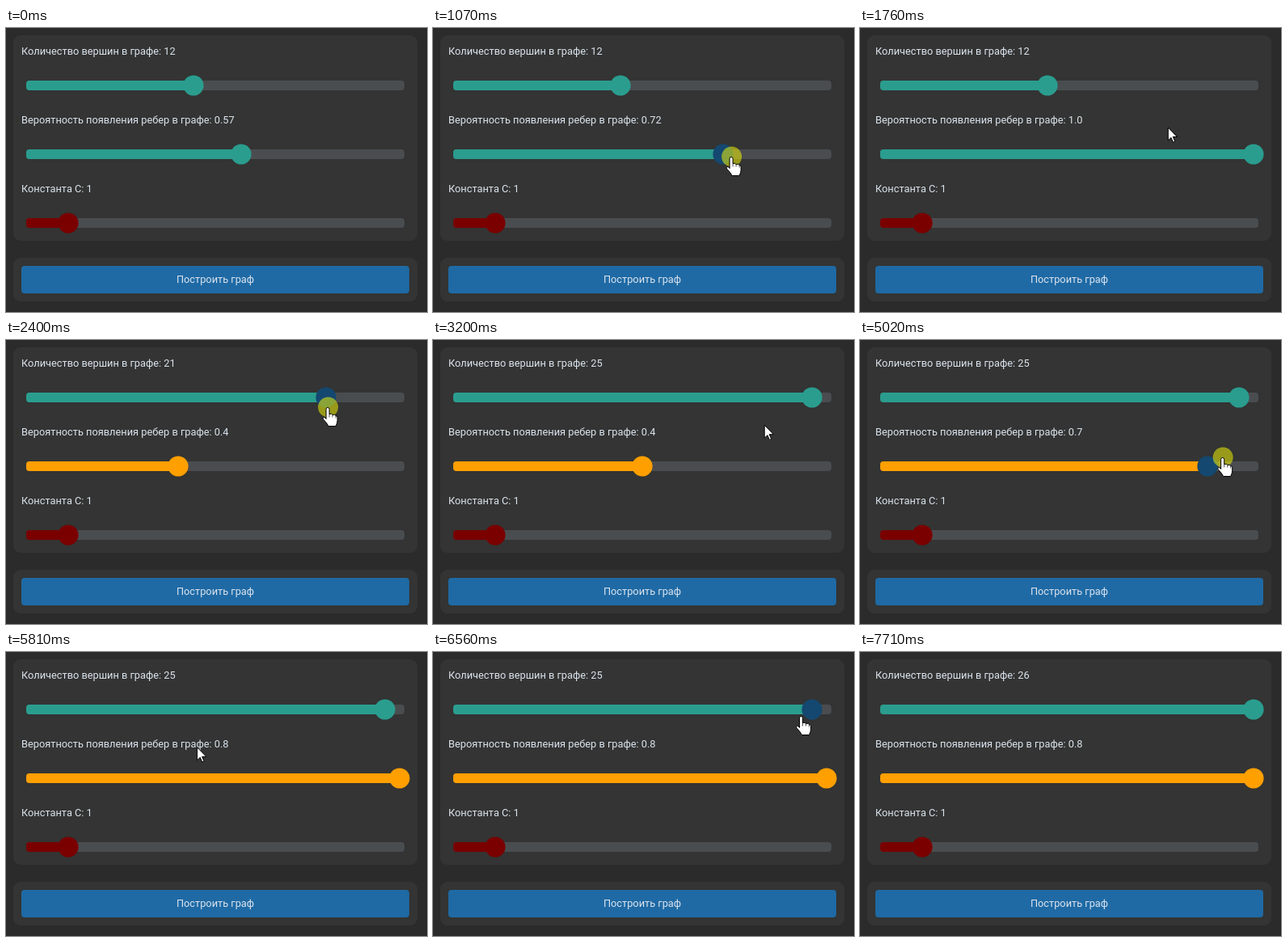
An HTML page that plays this animation: 521 px wide and 351 px high, repeating every 8000 ms.

```html
<!DOCTYPE html>
<html lang="ru">
<head>
<meta charset="utf-8">
<title>Параметры графа</title>
<style>
  html, body { margin: 0; width: 100%; height: 100%; overflow: hidden; background: #2b2b2b; }
  svg { display: block; }
  text { font: 12.8px Roboto, sans-serif; fill: #dce4ee; }
</style>
</head>
<body>
<svg width="521" height="351" viewBox="0 0 521 351">
  <rect width="521" height="351" fill="#2b2b2b"/>
  <path d="M520 0V351H521V0Z" fill="#242424"/>
  <rect x="9" y="9" width="500" height="254" rx="9" fill="#333433"/>
  <rect x="9" y="284" width="500" height="54" rx="9" fill="#333433"/>
  <rect x="19" y="294" width="480" height="34" rx="4" fill="#1f6aa5"/>
  <text x="259" y="315" text-anchor="middle">Построить граф</text>
  <g id="sliders"></g>
  <g id="cursor">
    <circle id="press" r="12.5" fill="#ff0" opacity=".5"/>
    <g id="hand" transform="translate(-.5 .5)" stroke="#000" stroke-linejoin="round">
      <path fill="#fff" d="M-2 2Q-2 0 0 0T2 2V8Q5 7 6 9Q9 8 10 10Q12 10 12 12V16Q12 19 10 23H1Q-1 19-5 15Q-7 12-4 12L-2 14Z"/>
      <path fill="none" stroke-width=".7" d="M2 8V12M6 9V12M10 10V13"/>
    </g>
    <path id="arrow" fill="#fff" stroke="#000" d="M.5.5V16.5L4.2 13L6.7 18.7L9 17.7L6.5 12H11.7Z"/>
  </g>
</svg>
<script>
const LOOP = 8000;
const TEAL = '#2a9d8f', ORANGE = '#ff9f00', RED = '#7a0000', HOVER = '#144870';
const rows = { vertices: 71, edges: 156, constant: 241 };
const $ = id => document.getElementById(id);
const mix = (a, b, u) => a + (b - a) * u;
const smooth = u => u * u * (3 - 2 * u);

// Large graphs get a narrower range of edge probability
const edgeLimit = vertices => Math.round(vertices) > 21 ? .8 : 1;
const ratioOf = {
  vertices: s => (s.vertices - 1) / 25,
  edges: s => s.edges / edgeLimit(s.vertices)
};
const knobX = ratio => 31 + 456 * ratio;

// Free pointer movement along a bent line
function glide(start, end, x, y, bendX = 0, bendY = 0) {
  return { start, end, apply(s, u) {
    const bend = Math.sin(Math.PI * u);
    s.x = mix(s.x, x, smooth(u)) + bendX * bend;
    s.y = mix(s.y, y, smooth(u)) + bendY * bend;
    s.pressed = false;
  } };
}

// The pointer holds a knob at an offset and may overshoot the end of the track
function drag(start, end, name, from, to, gripX, gripY) {
  return { start, end, apply(s, u) {
    s[name] = mix(from, to, u);
    s.x = knobX(ratioOf[name](s)) + gripX;
    s.y = rows[name] + gripY;
    s.pressed = u < 1;
    s.vertices = Math.min(s.vertices, 26);
    if (name === 'vertices' && from <= 20 && s.vertices > 20.5) s.edges = .4;
    s.edges = Math.min(s.edges, edgeLimit(s.vertices));
  } };
}

const steps = [
  glide(230, 670, 291, 155, -120, -40),
  drag(830, 1582, 'edges', .57, 1.04, 10, 3),
  glide(1582, 1950, 235, 83),
  drag(2000, 2578, 'vertices', 12, 25, 2.5, 12),
  glide(2578, 2610, 469, 86),
  glide(2960, 3640, 263, 151),
  drag(3720, 4400, 'edges', .4, .85, 3.5, -4),
  drag(4690, 4900, 'edges', .85, .55, 18.5, -11),
  drag(4900, 5140, 'edges', .55, .85, 18.5, -11),
  glide(5400, 5800, 236, 116),
  glide(5800, 6560, 456, 79, 0, 30),
  drag(6600, 6860, 'vertices', 25, 29, -13, 8),
  glide(7090, 7400, 256, 92, 0, 45),
  glide(7400, 7710, 560, 150)
];

function stateAt(t) {
  const state = { vertices: 12, edges: .57, x: 560, y: 64, pressed: false };
  for (const { start, end, apply } of steps) {
    if (t < start) break;
    apply(state, Math.min(1, (t - start) / (end - start)));
  }
  return state;
}

function makeSlider(y) {
  const group = document.createElementNS('http://www.w3.org/2000/svg', 'g');
  group.innerHTML = `<text x="19" y="${y - 38}"></text>
    <rect x="25" y="${y - 6}" width="468" height="12" rx="4" fill="#4a4d50"/>
    <rect x="25" y="${y - 6}" height="12" rx="4"/>
    <circle cy="${y}" r="12.6"/>`;
  $('sliders').append(group);
  const [label, , bar, knob] = group.children;
  return (text, ratio, color, hovered) => {
    const x = Math.round(knobX(ratio));
    label.textContent = text;
    bar.setAttribute('width', x - 25);
    bar.setAttribute('fill', color);
    knob.setAttribute('cx', x);
    knob.setAttribute('fill', hovered ? HOVER : color);
  };
}

const [setVertices, setEdges, setConstant] = Object.values(rows).map(makeSlider);
setConstant('Константа C: 1', .101, RED, false);

function show(id, visible) {
  $(id).style.display = visible ? '' : 'none';
}

function render(t) {
  const state = stateAt(t), { x, y, pressed } = state;
  state.vertices = Math.round(state.vertices);
  state.edges = Math.round(state.edges * 100) / 100;
  const { vertices, edges } = state;
  const over = row => x < 510 && Math.abs(y - row) <= 13;
  const overVertices = over(rows.vertices), overEdges = over(rows.edges);

  setVertices(`Количество вершин в графе: ${vertices}`,
    ratioOf.vertices(state), TEAL, overVertices);
  setEdges(`Вероятность появления ребер в графе: ${edges === 1 ? '1.0' : edges}`,
    ratioOf.edges(state), vertices > 20 ? ORANGE : TEAL, overEdges);

  const pointing = pressed || overVertices || overEdges;
  $('cursor').setAttribute('transform', `translate(${x.toFixed(1)} ${y.toFixed(1)})`);
  show('cursor', x < (pressed ? 535 : 512));
  show('press', pressed);
  show('hand', pointing);
  show('arrow', !pointing);
}

const start = performance.now();
function tick() {
  render((performance.now() - start) % LOOP);
  requestAnimationFrame(tick);
}
tick();
</script>
</body>
</html>
```
